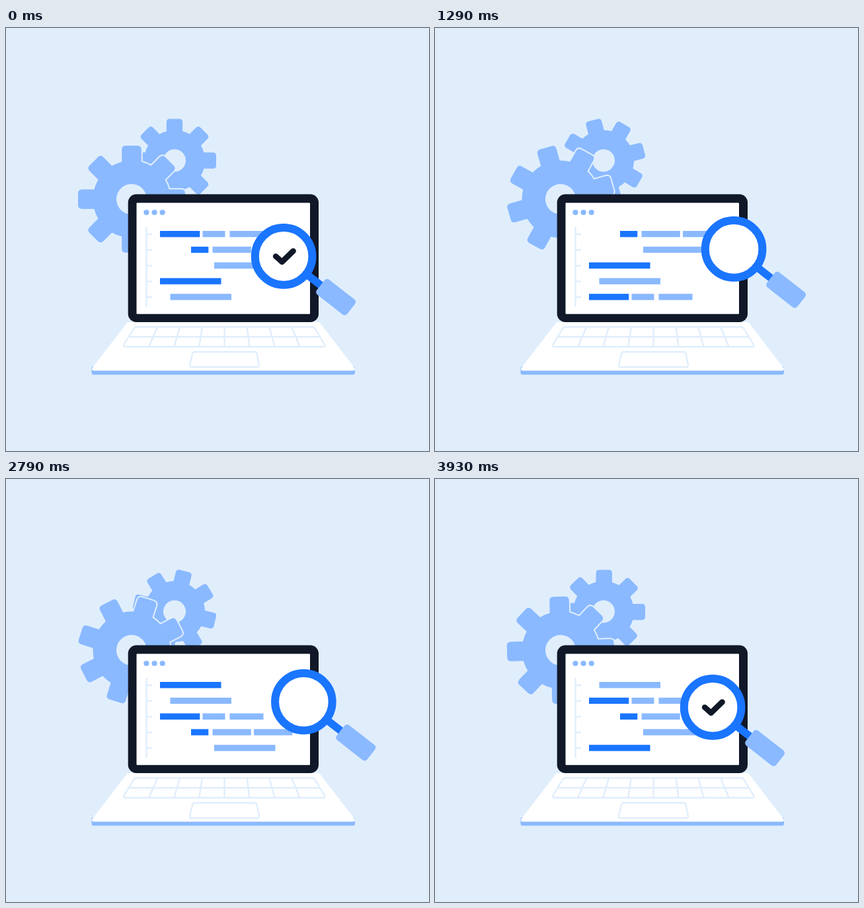
Recreate the animation shown at these times as an HTML page. Size 640 by 640 pixels, loop 4000 ms.

```html
<!DOCTYPE html>
<html lang="en">
<head>
<meta charset="utf-8">
<title>Code review</title>
<style>
  html, body { margin: 0; width: 100%; height: 100%; overflow: hidden; background: #e0eefc; }
  svg { display: block; width: 100vw; height: 100vh; }
  .light { fill: #8ab9ff; }
  .blue { fill: #1a75ff; }
  .dark { fill: #111828; }
  .white { fill: #fff; }
  .line { fill: none; stroke: #e0eefc; stroke-width: 2.4; stroke-linejoin: round; }
  .gear { fill: #8ab9ff; fill-rule: evenodd; stroke: #e0eefc; stroke-width: 4; paint-order: stroke; }
</style>
</head>
<body>
<svg viewBox="0 0 640 640">
  <path id="small" class="gear"/>
  <path id="big" class="gear"/>

  <rect class="light" x="129.5" y="512" width="398.5" height="12.6" rx="3"/>
  <path class="white" d="M184 445H474L527.5 514.5Q529 518.4 525 518.4H133Q129 518.4 130.5 514.5Z"/>
  <path id="keys" class="line"/>
  <path class="line" d="M286 490H376Q379 490 379.6 493L383 510Q383.400 513 380.500 513H280.500Q277.600 513 278 510L282 493Q282.700 490 286 490Z"/>

  <rect class="dark" x="184.700" y="251.500" width="288.300" height="193.500" rx="12.500"/>
  <rect class="white" x="197.500" y="264.500" width="262.500" height="168.300" rx="1"/>
  <g class="light">
    <circle cx="212.400" cy="279" r="4.100"/>
    <circle cx="224.600" cy="279" r="4.100"/>
    <circle cx="236.700" cy="279" r="4.100"/>
  </g>
  <path class="line" d="M212.500 301V422M212.500 312h8.500m-8.500 23.800h8.500m-8.500 23.800h8.500m-8.500 23.800h8.500m-8.500 23.800h8.500"/>
  <g id="code"></g>

  <g id="lens">
    <g transform="rotate(38)">
      <rect class="blue" x="45" y="-5.800" width="30" height="11.600"/>
      <rect class="light" x="71" y="-14.500" width="58.500" height="29" rx="5"/>
    </g>
    <circle class="white" r="43.300" stroke="#1a75ff" stroke-width="12"/>
    <path id="check" d="M-12 0L-2.500 8.500L14.500 -8" fill="none" stroke="#111828" stroke-width="8.500"
      stroke-linecap="round" stroke-linejoin="round" pathLength="100"/>
  </g>
</svg>
<script>
const NS = 'http://www.w3.org/2000/svg';
const LOOP = 4000;
const $ = id => document.getElementById(id);
const make = (tag, attrs, parent) => {
  const el = document.createElementNS(NS, tag);
  for (const key in attrs) el.setAttribute(key, attrs[key]);
  if (parent) parent.append(el);
  return el;
};

// Eight round-cornered teeth on a disc with a hole
function gearPath(outer, disc, half, corner, hole) {
  const base = Math.sqrt(disc * disc - half * half);
  let d = '';
  for (let k = 0; k < 8; k++) {
    const c = Math.cos(k * Math.PI / 4), s = Math.sin(k * Math.PI / 4);
    const p = (x, y) => `${(x * c - y * s).toFixed(2)} ${(x * s + y * c).toFixed(2)} `;
    d += (k ? `A${disc} ${disc} 0 0 1 ` : 'M') + p(base, -half)
      + 'L' + p(outer - corner, -half) + 'Q' + p(outer, -half) + p(outer, corner - half)
      + 'L' + p(outer, half - corner) + 'Q' + p(outer, half) + p(outer - corner, half)
      + 'L' + p(base, half);
  }
  return d + `A${disc} ${disc} 0 0 1 ${base} ${-half}Z`
    + `M${hole} 0A${hole} ${hole} 0 1 0 ${-hole} 0A${hole} ${hole} 0 1 0 ${hole} 0Z`;
}
$('big').setAttribute('d', gearPath(81, 58.5, 14.8, 6, 23));
$('small').setAttribute('d', gearPath(63, 46, 12.2, 5, 17));

// Keyboard grid
let keys = 'M198 452.300H463Q466 452.300 467.500 455L482 479Q483.500 482.300 480 482.300H181Q177 482.300 178.500 479L193 455Q194.700 452.300 198 452.300ZM187 467.200H474';
for (let k = 1; k < 8; k++) keys += `M${195.5 + 33.8 * k} 452.300L${178 + 38.1 * k} 482.300`;
$('keys').setAttribute('d', keys);

// Code lines: [x, width, colour] per bar
const rows = [
  [[233, 60.3, 'blue'], [297.5, 34, 'light'], [338.5, 51, 'light']],
  [[280, 26.3, 'blue'], [312.5, 58.3, 'light'], [375, 58.3, 'light']],
  [[315, 92.5, 'light']],
  [[233, 92.5, 'blue']],
  [[248.5, 92.5, 'light']]
].map(bars => {
  const g = make('g', {}, $('code'));
  for (const [x, width, cls] of bars) make('rect', { x, y: -4.7, width, height: 9.4, class: cls }, g);
  return g;
});

const part = (t, from, to) => Math.min(1, Math.max(0, (t - from) / (to - from)));
const smooth = p => p * p * (3 - 2 * p);

const away = make('path', { d: 'M0 0C4 -9 21 -15.500 32 -11' });
const back = make('path', { d: 'M32 -11C29 -4 11 6 0 0' });
const along = (path, p) => path.getPointAtLength(p * path.getTotalLength());

function lensAt(t) {
  if (t < 2000) return along(away, smooth(part(t, 95, 1195)));
  return along(back, smooth(1 - (1 - part(t, 2675, 3455)) ** 1.25));
}

function drawCheck(t) {
  const from = t < 2000 ? 100 * smooth(part(t, 0, 720)) : 0;
  const to = t < 2000 ? 100 : 100 * smooth(part(t, 3300, 3900));
  const check = $('check');
  check.setAttribute('visibility', to - from > 0.1 ? 'visible' : 'hidden');
  check.setAttribute('stroke-dasharray', `0 ${from} ${to - from} 300`);
}

const place = (el, x, y, turn = 0) => el.setAttribute('transform', `translate(${x} ${y}) rotate(${turn})`);

function draw(t) {
  place($('big'), 190, 259, 90 * t / LOOP);
  place($('small'), 255, 200.5, -45 * t / LOOP);
  const shift = Math.floor(t / 800);
  rows.forEach((row, i) => place(row, 0, 311.7 + 23.8 * ((i - shift + 5) % 5)));
  const { x, y } = lensAt(t);
  place($('lens'), 420.1 + x, 345.4 + y);
  drawCheck(t);
}

const start = performance.now();
function tick() {
  draw((performance.now() - start) % LOOP);
  requestAnimationFrame(tick);
}
tick();
</script>
</body>
</html>
```
